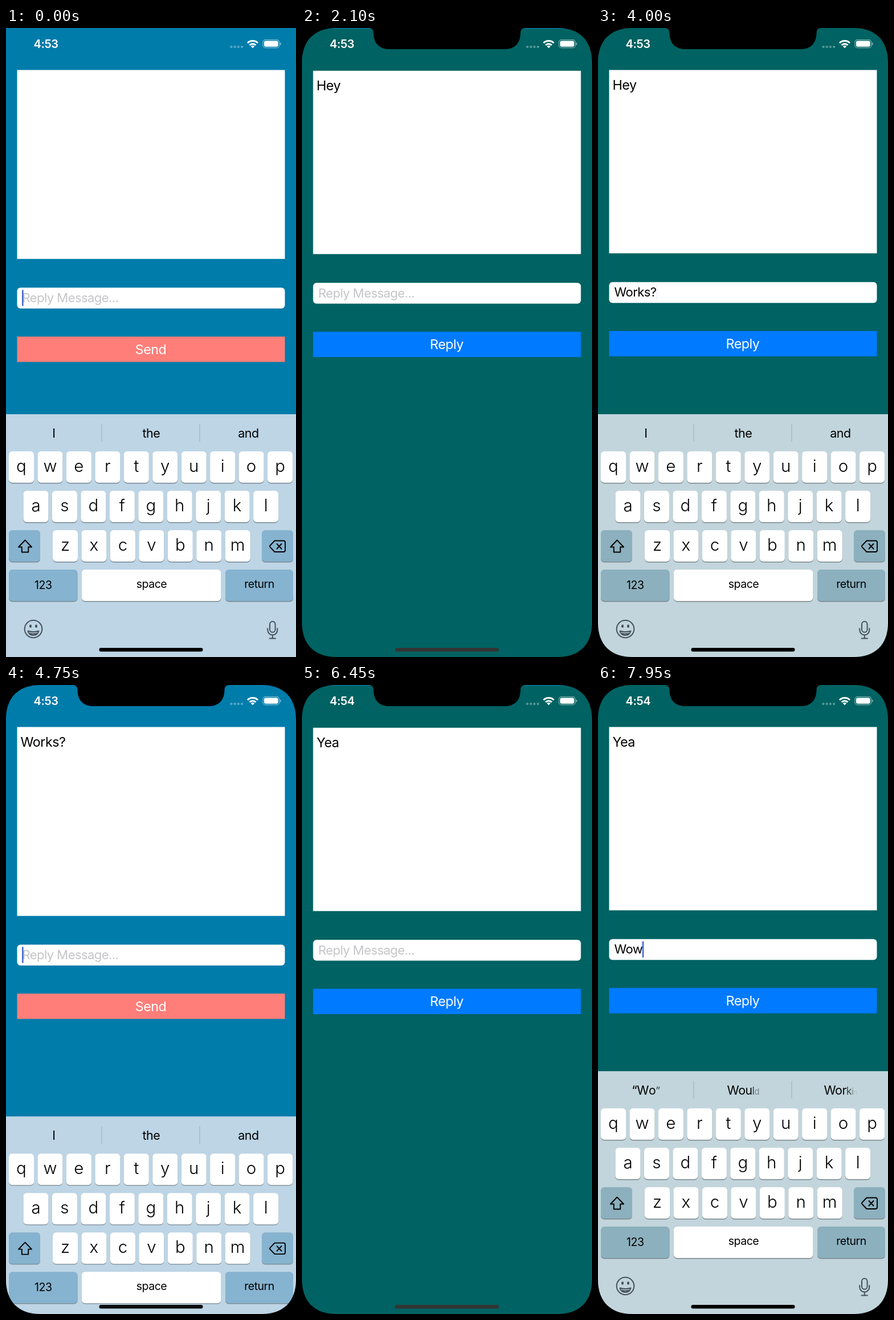
Animation, 509 px wide and 1101 px high, one loop 8000 ms. Source, as an HTML page:

```html
<!DOCTYPE html>
<html lang="en">
<head>
<meta charset="utf-8">
<title>Reply messages</title>
<style>
  html, body { margin: 0; width: 100%; height: 100%; overflow: hidden; background: #000; }
  svg { display: block; width: 100vw; height: 100vh; }
  text { font-family: Inter, Roboto, sans-serif; white-space: pre; }
  .field { font-size: 22px; letter-spacing: -.55px; }
  .body { font-size: 23.3px; letter-spacing: -.5px; }
  .key { font-size: 29.5px; font-weight: 300; text-anchor: middle; }
  .label { font-size: 19.5px; letter-spacing: -.5px; text-anchor: middle; }
  .hint { font-size: 21.5px; letter-spacing: -.5px; text-anchor: middle; }
  .clock { font-size: 20px; font-weight: 600; letter-spacing: -.4px; fill: #fff; }
  .mid { text-anchor: middle; fill: #fff; }
  .line { fill: none; stroke-linecap: round; stroke-linejoin: round; }
</style>
</head>
<body>
<svg id="stage" viewBox="0 0 509 1101"></svg>
<script>
const W = 509, H = 1101, LOOP = 8000, STEP = 50, KB = 430;
const SHEET_TOGGLES = [1605, 4070, 5955];
const KB_TOGGLES = [1605, 2450, 4070, 4580, 5955, 6700];

const TYPED = [
  [-300, ''], [1200, 'H'], [1300, 'He'], [1450, 'Hey'], [1600, ''],
  [2450, ''], [3200, 'W'], [3350, 'Wo'], [3450, 'Wor'], [3550, 'Work'], [3650, 'Works'], [3800, 'Works?'],
  [4580, ''], [4650, ''], [5400, 'Y'], [5550, 'Ye'], [5700, 'Yea'], [5955, ''],
  [6700, ''], [7350, 'W'], [7500, 'Wo'], [7900, 'Wow']
];
const IDLE = 'I the and';
const HINTS = [
  [-1000, IDLE], [1260, '“H” He Hey'], [1420, '“He” Hey Hello'], [1520, '“Hey” Heyy Heyyy'], [1600, IDLE],
  [3260, '“W” What Why'], [3400, '“Wo” Would Work'], [3500, '“Wor” Work World'],
  [3600, '“Work” Works Working'], [3700, '“Works” Workshop Worked'], [3820, IDLE],
  [5460, '“Y” You Yes'], [5600, '“Ye” Yes Yeah'], [5760, '“Yea” Yeah Year'], [5955, IDLE],
  [7600, '“W” What Why'], [7840, '“Wo” Would Working']
];

const clamp = (v, lo = 0, hi = 1) => Math.min(hi, Math.max(lo, v));
const mix = (a, b, k) => `rgb(${a.map((v, i) => Math.round(v + (b[i] - v) * k))})`;
const latest = (list, t) => list.filter(e => e[0] <= t).pop();
const passed = (list, t) => list.filter(v => v <= t).length;

// Critically damped spring, from 1 down to 0
const spring = ms => {
  const x = Math.max(0, ms) * 0.01826;
  return (1 + x) * Math.exp(-x);
};

const screen = (id, bg, boxH, button, label) => {
  const y = 74 + boxH;
  return `<g id="${id}">
    <rect width="${W}" height="${H + 4}" fill="${bg}"/>
    <rect x="19.5" y="73.5" width="470" height="${boxH}" fill="#fff"/>
    <text id="${id}Body" class="body" x="25.5" y="107.5"/>
    <rect x="19.5" y="${y + 49.8}" width="470" height="36.5" rx="6" fill="#fff"/>
    <text id="${id}Field" class="field" x="28.5" y="${y + 75.5}"/>
    <rect id="${id}Caret" y="${y + 53.5}" width="2.6" height="28.5" rx="1" fill="#4668d4"/>
    <rect x="19.5" y="${y + 135.5}" width="470" height="44.3" fill="${button}"/>
    <text class="body mid" x="254" y="${y + 166}">${label}</text>
  </g>`;
};

const key = (x, y, w, special) =>
  `<rect x="${x}" y="${y + 1.4}" width="${w}" height="55" rx="6" opacity=".36"/>
   <rect ${special ? 'class="special"' : 'fill="#fff"'} x="${x}" y="${y}" width="${w}" height="55" rx="6"/>`;

const keyRow = (letters, x, y) => [...letters].map((c, i) => {
  const kx = x + i * 50.45;
  return key(kx, y, 44, false) + `<text class="key" x="${kx + 22}" y="${y + 36}">${c}</text>`;
}).join('');

const keyboard = `<g id="kb">
  <rect id="kbBack" y="676" width="${W}" height="426"/>
  <path d="M168 693V724M340 693V724" stroke="#000" stroke-opacity=".16" stroke-width="1.2"/>
  ${[84, 254.8, 425.5].map((x, i) => `<text id="hint${i}" class="hint" x="${x}" y="716.5"/>`).join('')}
  ${keyRow('qwertyuiop', 5, 741)}
  ${keyRow('asdfghjkl', 30.5, 810)}
  ${keyRow('zxcvbnm', 82, 879)}
  ${key(5, 879, 55, true)}${key(449, 879, 55, true)}
  ${key(5, 948, 120.5, true)}${key(132.8, 948, 244.6, false)}${key(385, 948, 119, true)}
  <text class="label" x="65.3" y="982">123</text>
  <text class="label" x="255.5" y="980">space</text>
  <text class="label" x="444.5" y="980">return</text>
  <g class="line" stroke="#000" stroke-width="1.9">
    <path d="M33.5 896.5L45 908.5H39.2V917.5H27.8V908.5H22Z"/>
    <path d="M471.5 897.5H487a3 3 0 0 1 3 3V914a3 3 0 0 1-3 3H471.5L463.5 908.5a2 2 0 0 1 0-2.6ZM475.5 903L483.5 911.5M483.5 903L475.5 911.5"/>
  </g>
  <g class="line" stroke="#46525c" stroke-width="2">
    <circle cx="48" cy="1052" r="15.3"/>
    <path d="M38.5 1055.5Q48 1058.5 57.5 1055.5Q55.5 1063 48 1063T38.5 1055.5ZM40.5 1059.5Q48 1061.5 55.5 1059.5"/>
    <rect x="463" y="1038.8" width="9.6" height="19" rx="4.8"/>
    <path d="M459.3 1051V1054a8.5 8.5 0 0 0 17 0V1051M467.8 1062.5V1068.5M462.5 1068.5H473"/>
  </g>
  <g fill="#46525c"><ellipse cx="43" cy="1047" rx="2" ry="2.8"/><ellipse cx="53" cy="1047" rx="2" ry="2.8"/></g>
</g>`;

const statusBar = `
  <text id="clock" class="clock" x="48.5" y="35"/>
  <g fill="#fff" fill-opacity=".32">
    ${[393.5, 399.7, 405.9, 412.1].map(x => `<rect x="${x}" y="31" width="4" height="4" rx="1.3"/>`).join('')}
  </g>
  <g fill="none" stroke="#fff" stroke-width="3">
    <path d="M424 26.2a12.7 12.7 0 0 1 18 0M427.6 30a7.6 7.6 0 0 1 10.8 0"/>
  </g>
  <path d="M433 35.2L429.8 32a4.5 4.5 0 0 1 6.4 0Z" fill="#fff"/>
  <rect x="451" y="20.6" width="28.6" height="14" rx="4.2" fill="none" stroke="#fff" stroke-opacity=".5" stroke-width="1.2"/>
  <rect x="453" y="22.5" width="24.6" height="10.2" rx="2.6" fill="#fff"/>
  <path d="M481 25.2a2.6 2.6 0 0 1 0 5Z" fill="#fff" fill-opacity=".55"/>`;

const bezel = `<g id="bezel">
  <path fill-rule="evenodd" d="M-2-2H511V1103H-2ZM60 0H449C487 0 509 22 509 60V1041C509 1079 487 1101 449 1101H60C22 1101 0 1079 0 1041V60C0 22 22 0 60 0Z"/>
  <path d="M117-1V0Q125.5 0 125.5 8.5C125.5 27 136 37 153 37H356C373 37 383.5 27 383.5 8.5Q383.5 0 392 0V-1Z"/>
</g>`;

document.getElementById('stage').innerHTML =
  screen('blue', '#007cab', 330.7, '#ff7e79', 'Send') +
  screen('green', '#006262', 320.9, '#007aff', 'Reply') +
  keyboard + statusBar + bezel +
  '<rect id="home" x="163.5" y="1085" width="182" height="6.4" rx="3.2"/>';

const $ = id => document.getElementById(id);
const specials = document.querySelectorAll('.special');
const put = (el, attrs) => { for (const k in attrs) el.setAttribute(k, attrs[k]); };

function sheetY(t, kbUp) {
  const n = passed(SHEET_TOGGLES, t);
  if (!n) return H;
  const age = t - SHEET_TOGGLES[n - 1];
  if (n % 2 === 0) return H * (1 - spring(age));
  return kbUp ? 0 : H * spring(Math.min(age, 495));
}

function keyboardY(t) {
  const n = passed(KB_TOGGLES, t);
  if (!n) return 0;
  const s = spring(t - KB_TOGGLES[n - 1]);
  return KB * (n % 2 ? 1 - s : s);
}

function blink(age) {
  if (age < 500) return 1;
  const p = age % 1000;
  return p < 500 ? clamp(p / 150) : 1 - clamp((p - 500) / 150);
}

function drawField(id, text, caret) {
  const field = $(id + 'Field');
  field.textContent = text || 'Reply Message...';
  put(field, { fill: text ? '#000' : '#c5c5c8' });
  const x = text ? 28 + field.getComputedTextLength() : 28;
  put($(id + 'Caret'), { x, opacity: caret });
}

// Letters of a hint fade in and grow one after another
function drawHints(t) {
  const [start, words] = latest(HINTS, t);
  const reach = words === IDLE ? 9 : (t - start) / 70;
  words.split(' ').forEach((word, n) => {
    $('hint' + n).innerHTML = [...word].map((c, i) => {
      const p = clamp(reach - i * 0.3);
      if (p <= 0) return '';
      return p === 1 ? c : `<tspan font-size="${(21.5 * (0.5 + p / 2)).toFixed(2)}" opacity="${p.toFixed(2)}">${c}</tspan>`;
    }).join('');
  });
}

function draw(t) {
  const kbCount = passed(KB_TOGGLES, t);
  const kbY = keyboardY(t);
  const y = sheetY(t, kbCount % 2 === 0);
  const cover = 1 - y / H;
  const onGreen = (t >= 2450 && t < 4580) || t >= 6700;
  const [since, text] = latest(TYPED, t);

  let caret = kbCount % 2 ? 0 : blink(t - since);
  if (t >= 4000 && t < 4580) caret = 0.06;
  drawField('blue', onGreen ? '' : text, onGreen ? 0 : caret);
  drawField('green', onGreen ? text : '', onGreen ? caret : 0);
  $('blueBody').textContent = t < 4070 ? '' : 'Works?';
  $('greenBody').textContent = t < 5000 ? 'Hey' : 'Yea';
  drawHints(t);

  put($('green'), { transform: `translate(0 ${y.toFixed(2)})` });
  put($('kb'), { transform: `translate(0 ${kbY.toFixed(2)})` });
  put($('kbBack'), { fill: mix([189, 213, 229], [194, 213, 220], cover) });
  const keyFill = mix([134, 179, 207], [140, 176, 190], cover);
  specials.forEach(k => put(k, { fill: keyFill }));

  $('clock').textContent = t < 5300 ? '4:53' : '4:54';
  put($('bezel'), { visibility: t < 1600 ? 'hidden' : 'visible' });
  put($('home'), { fill: mix([0, 0, 0], [52, 52, 52], kbY / KB) });
}

const begin = performance.now();
function tick() {
  const t = (performance.now() - begin) % LOOP;
  draw(Math.floor(t / STEP) * STEP);
  requestAnimationFrame(tick);
}
tick();
</script>
</body>
</html>
```
